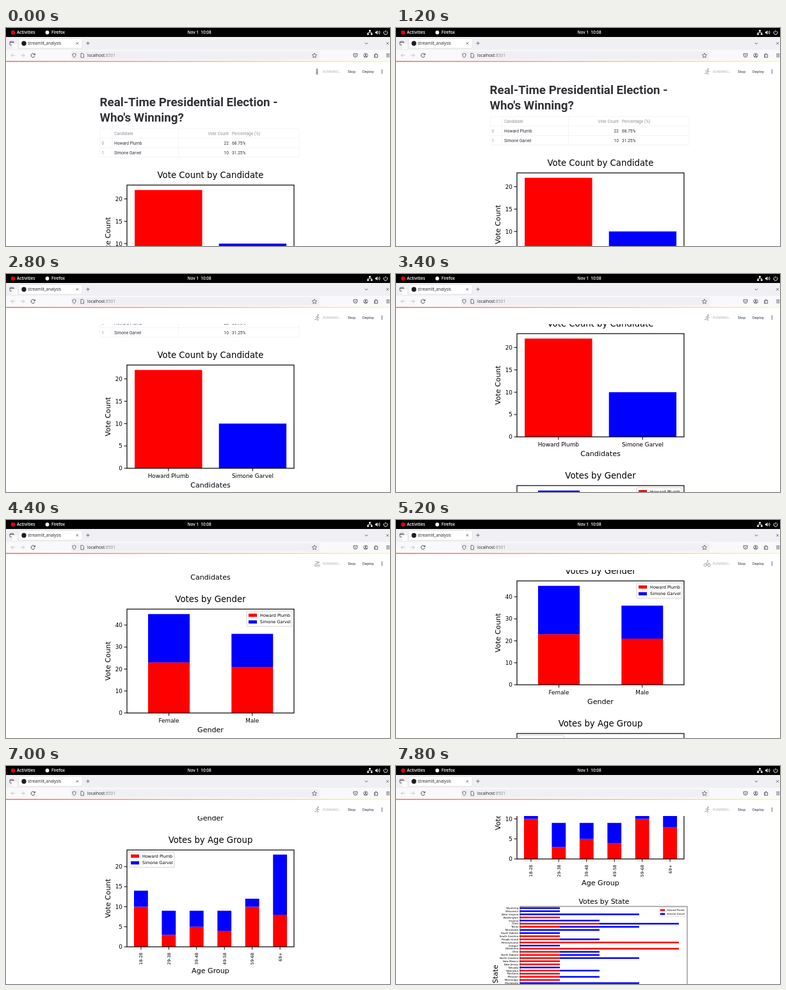
These frames come from a looping animation (600x340 px, 8 s). An HTML page:

```html
<!DOCTYPE html>
<html lang="en">
<head>
<meta charset="utf-8">
<title>Election dashboard</title>
<style>
  html, body { margin: 0; width: 100%; height: 100%; overflow: hidden; background: #fff; }
  svg { display: block; width: 600px; height: 340px; }
  text { white-space: pre; }
  .plot { font-family: "DejaVu Sans", sans-serif; }
  .app { font-family: Roboto, sans-serif; }
  .ui { font-family: "Open Sans", sans-serif; }
</style>
</head>
<body>
<svg id="stage" viewBox="0 0 600 340"></svg>
<script>
const RED = '#f00', BLUE = '#00f', INK = '#31333f';
const CANDIDATES = ['Howard Plumb', 'Simone Garvel'];
const LOOP = 8000, STEP = 200;

// Resting points of the scroll: [time, offset]
const SCROLL = [[0, 0], [800, 0], [1800, 53], [2200, 53], [3400, 152], [4400, 343],
  [5200, 387], [6200, 452], [7000, 589], [7800, 726]];

const rect = (x, y, w, h, fill, extra = '') =>
  `<rect x="${x}" y="${y}" width="${w}" height="${h}" fill="${fill}" ${extra}/>`;
const path = (d, stroke = '#000', width = 1, extra = '') =>
  `<path d="${d}" fill="none" stroke="${stroke}" stroke-width="${width}" ${extra}/>`;
const dot = (x, y, r, fill) => `<circle cx="${x}" cy="${y}" r="${r}" fill="${fill}"/>`;

// y is the middle of the capital letters
function text(x, y, string, size, { fill = '#000', anchor = 'start', weight = 400, turn = false } = {}) {
  const rotate = turn ? `transform="rotate(-90 ${x} ${y})"` : '';
  return `<text x="${x}" y="${y + size * 0.365}" font-size="${size}" fill="${fill}" ` +
    `text-anchor="${anchor}" font-weight="${weight}" ${rotate}>${string}</text>`;
}
const middle = (x, y, string, size, turn) => text(x, y, string, size, { anchor: 'middle', turn });

function legend(x, y, scale = 1) {
  const entries = CANDIDATES.map((name, i) =>
    rect(3, 4 + i * 10.5, 13, 5, i ? BLUE : RED) + text(21, 6.5 + i * 10.5, name, 6.5)).join('');
  return `<g transform="translate(${x} ${y}) scale(${scale})">` +
    rect(0, 0, 71, 24, '#fff', 'fill-opacity=".8" stroke="#ccc" stroke-width=".9" rx="2"') + entries + '</g>';
}

// bars: [label, red votes, total votes]
function barChart({ top, bottom, title, xLabel, step, bars, firstX, pitch, barWidth, turned }) {
  const limit = Math.max(...bars.map(bar => bar[2])) * 1.05;
  const yOf = votes => bottom - votes * (bottom - top) / limit;
  let out = '';
  bars.forEach(([label, red, total], i) => {
    const x = firstX + i * pitch, left = x - barWidth / 2;
    out += rect(left, yOf(red), barWidth, bottom - yOf(red), RED);
    out += rect(left, yOf(total), barWidth, yOf(red) - yOf(total), BLUE);
    out += path(`M${x} ${bottom}v4.5`);
    out += turned
      ? text(x, bottom + 9, label, 6.5, { anchor: 'end', turn: true })
      : middle(x, bottom + 12, label, 8.85);
  });
  for (let votes = 0; votes <= limit; votes += step) {
    out += path(`M189 ${yOf(votes)}h-4.5`) + text(182, yOf(votes), votes, 8.85, { anchor: 'end' });
  }
  out += rect(189, top, 261, bottom - top, 'none', 'stroke="#000" stroke-width="1.2"');
  out += middle(319.5, top - 15.5, title, 13.3);
  out += middle(319.5, bottom + (turned ? 37 : 26), xLabel, 11.1);
  return out + middle(159, (top + bottom) / 2, 'Vote Count', 11.1, true);
}

// state, red votes, total votes
const STATES = `Wyoming 0 1|Wisconsin 0 1|West Virginia 0 3|Washington 1 1|Virginia 0 2|Utah 2 4|Texas 1 3
|Tennessee 0 2|South Dakota 0 1|South Carolina 1 1|Rhode Island 1 2|Pennsylvania 4 4|Oregon 0 1|Oklahoma 4 4
|Ohio 1 2|North Dakota 1 2|North Carolina 1 3|New Mexico 1 1|New Jersey 1 1|Nevada 0 1|Nebraska 1 2
|Montana 1 1|Missouri 1 2|Mississippi 1 1|Minnesota 0 3`;

function stateChart() {
  const top = 945, unit = 62;
  let out = middle(325, top - 8, 'Votes by State', 10.9) + middle(155, top + 105.5, 'State', 11, true);
  STATES.split('|').forEach((row, i) => {
    const [, name, red, total] = row.trim().match(/(.+) (\d) (\d)/);
    const y = top + 2.6 + i * 4.875;
    out += rect(194, y - 1.25, red * unit, 2.5, RED) + rect(194 + red * unit, y - 1.25, (total - red) * unit, 2.5, BLUE);
    out += path(`M194 ${y}h-2`, '#000', 0.5) + text(191, y, name, 4, { anchor: 'end' });
  });
  out += rect(194, top, 261, 211, 'none', 'stroke="#000" stroke-width=".6"');
  return out + legend(411, top + 2, 0.58);
}

function voteTable() {
  const gray = '#92939b', rows = [['0', CANDIDATES[0], '22', '68.75%'], ['1', CANDIDATES[1], '10', '31.25%']];
  let out = rect(147, 157, 311, 44.5, '#fff', 'stroke="#f0f0f3" stroke-width=".8" rx="2"');
  out += path('M147 172H458M147 186.7H458M166 157v44.5M269.5 157v44.5', '#f0f0f3', 0.7);
  [['', 'Candidate', 'Vote Count', 'Percentage (%)'], ...rows].forEach(([index, name, count, share], i) => {
    const y = 165 + i * 14.6, fill = i ? INK : gray;
    out += text(149.5, y, index, 6.4, { fill: gray }) + text(169, y, name, 6.6, { fill });
    out += text(348, y, count, 6.6, { fill, anchor: 'end' }) + text(353, y, share, 6.6, { fill });
  });
  return out;
}

function page() {
  const heading = { fill: '#303036', weight: 700 };
  return `<g class="app">${text(146.5, 115.3, 'Real-Time Presidential Election -', 18.8, heading)}
    ${text(146.5, 139.3, "Who's Winning?", 18.8, heading)}${voteTable()}</g><g class="plot">` +
    barChart({
      top: 245, bottom: 406, title: 'Vote Count by Candidate', xLabel: 'Candidates', step: 5,
      bars: [[CANDIDATES[0], 22, 22], [CANDIDATES[1], 0, 10]], firstX: 253.8, pitch: 131.6, barWidth: 105.4
    }) +
    barChart({
      top: 482, bottom: 644, title: 'Votes by Gender', xLabel: 'Gender', step: 10,
      bars: [['Female', 23, 45], ['Male', 21, 36]], firstX: 254.5, pitch: 130.3, barWidth: 65
    }) + legend(376, 485) +
    barChart({
      top: 720, bottom: 871, title: 'Votes by Age Group', xLabel: 'Age Group', step: 5, turned: true,
      bars: [['18-28', 10, 14], ['29-38', 3, 9], ['39-48', 5, 9], ['49-58', 4, 9], ['59-68', 10, 12], ['69+', 8, 23]],
      firstX: 210.9, pitch: 43.45, barWidth: 21.8
    }) + legend(192, 723) + stateChart() + '</g>';
}

function browser() {
  const dark = '#3a3a42', pale = '#b8b8bd', white = { fill: '#fff', weight: 600 };
  const topBar = rect(0, 0, 600, 14, '#000') + dot(11, 7, 3.2, '#e00') + text(17, 7, 'Activities', 6.5, white) +
    dot(64.5, 7, 2.9, '#fff') + text(71, 7, 'Firefox', 6.4, white) +
    text(302, 7, 'Nov 1  10:08', 6.4, { ...white, anchor: 'middle' }) +
    path('M568.5 4v3M565.5 9.5v-2.5h6v2.5', '#fff', 0.8) + rect(567.2, 3, 2.6, 2.4, '#fff') +
    rect(564.3, 8.4, 2.6, 2.4, '#fff') + rect(570, 8.4, 2.6, 2.4, '#fff') +
    '<path d="M577 5.8h1.5l2-2v6.5l-2-2H577z" fill="#fff"/>' +
    path('M582 5q1.4 2 0 4M583.3 4q2 3 0 6', '#fff', 0.7) +
    path('M591.3 4.9a3 3 0 1 0 3.6 0M593.1 3.5v3.2', '#fff', 0.9);
  const tabs = rect(0, 14, 600, 20, '#f0f0f4') +
    rect(20, 16.5, 99, 15, '#fff', 'rx="2" stroke="#dcdce0" stroke-width=".6"') +
    rect(6, 21, 6, 5.5, 'none', `rx="1" stroke="${dark}" stroke-width=".8"`) + path('M6 22.7h6', dark, 0.8) +
    rect(9, 23.5, 9.5, 10, '#fafafa', 'stroke="#ddd" stroke-width=".5"') +
    dot(28, 24, 3.7, '#1c1c22') + text(34, 24, 'streamlit_analysis', 6.3, { fill: '#222' }) +
    path('M109.7 22.2l3.4 3.4m0-3.4l-3.4 3.4M594.4 22.2l3.6 3.6m0-3.6l-3.6 3.6', dark, 0.7) +
    path('M128 21v5.6M125.200 23.800h5.600', dark, 0.7) +
    path('M560.8 23l2.2 2.2 2.2-2.2', dark, 0.8);
  const toolbar = rect(0, 34, 600, 18, '#f9f9fb') + rect(102, 36, 388, 13.5, '#f0f0f4', 'rx="2"') +
    path('M14 42.7H8m2.6-2.6L8 42.7l2.6 2.6M23 42.7h6m-2.6-2.6l2.6 2.6-2.6 2.6', pale, 0.8) +
    path('M44.8 41.3a3 3 0 1 0 .2 2.4M45.3 39.5v2.3H43', dark, 0.9) +
    path('M106.5 39.6l2.7 1q0 4-2.7 5.6-2.7-1.6-2.7-5.6z', dark, 0.7) +
    path('M117 39.6h3l1.5 1.5v4.9H117z', dark, 0.7) +
    text(127, 42.8, 'localhost<tspan fill="#85858c">:8501</tspan>', 6.5, { fill: '#222' }) +
    path('M482 39.2l1.1 2.3 2.5.3-1.8 1.8.4 2.5-2.2-1.2-2.2 1.2.4-2.5-1.8-1.8 2.5-.3z', dark, 0.7) +
    path('M543 40h6v2.5a3 3 0 0 1-6 0zM544.5 42l1.5 1.4 1.5-1.4', dark, 0.8) +
    `<circle cx="562" cy="42.7" r="3.2" fill="none" stroke="${dark}" stroke-width=".7"/>` +
    dot(562, 41.8, 1.1, dark) + path('M560 44.6q2-1.6 4 0', dark, 0.9) +
    path('M575.5 41.5h1.7v-1.5h1.8v1.5h1.7v4.3h-5.2v-1.6h1.3v-1.3h-1.3z', dark, 0.8) +
    path('M594.200 40.5h5.2m-5.2 2.2h5.2m-5.2 2.2h5.2', dark, 0.8);
  const small = { fill: INK };
  const header = rect(0, 51.5, 600, 1.3, 'url(#stripe)') +
    `<g class="app">${text(495, 68, 'RUNNING...', 5.7, { fill: '#b4b5bb' })}${text(534, 68, 'Stop', 5.9, small)}` +
    `${text(557, 68, 'Deploy', 5.9, small)}</g>` +
    [65.7, 68, 70.3].map(y => dot(587.5, y, 0.8, INK)).join('');
  return `<g class="ui">${topBar}${tabs}${toolbar}${header}</g>`;
}

// Activity figures, each in a 10 by 10 box
const FIGURES = {
  stand: dot(5, 1.5, 1.2, '#777') + path('M5 3v3.5M3.5 4h3M4.2 9.5V6h1.6v3.5', '#777', 1.1),
  run: dot(6.6, 1.3, 1.1, '#8c8d94') + path('M2.5 4.5l2-1.3 1.5.3-1.2 2.7 1.7 1.3-.5 2.5M4.8 6.2l-1 1.8H1.2M6 3.5l1 1.5h1.8', '#8c8d94', 0.9),
  swim: dot(7.5, 3, 1.1, '#8c8d94') + path('M2 2.2l3-.4 1.3 2.5L2 5.5M.5 7q1.2-1 2.3 0t2.3 0 2.3 0 2.3 0M.5 9q1.2-1 2.3 0t2.3 0 2.3 0 2.3 0', '#8c8d94', 0.8),
  cycle: dot(6, 1, 1, '#8c8d94') + path('M0 7.3a2.1 2.1 0 1 0 4.2 0a2.1 2.1 0 1 0-4.2 0M6.3 7.3a2.1 2.1 0 1 0 4.2 0a2.1 2.1 0 1 0-4.2 0M5.2 8V6L3.5 4.7l2-2L7 4.3h1.6', '#8c8d94', 0.8),
  wheel: dot(4.5, 1.2, 1.1, '#8c8d94') + path('M4.3 2.7v3.2h2.8l1 2.8h1M4.3 4h2.5M3.2 4.7a2.5 2.5 0 1 0 3.3 3', '#8c8d94', 0.9)
};
// [start time, figure]
const ACTIVITY = [[0, 'stand'], [1200, 'run'], [3800, 'swim'], [4800, 'cycle'], [5800, 'wheel'], [7000, 'run']];

document.getElementById('stage').innerHTML =
  `<defs><linearGradient id="stripe"><stop stop-color="#ff4b4b"/><stop offset="1" stop-color="#fffd80"/></linearGradient>
  <clipPath id="view">${rect(0, 78, 600, 262, '#000')}</clipPath></defs>
  <g clip-path="url(#view)"><g id="page">${page()}</g></g>${browser()}<g id="figure" transform="translate(481 63)"></g>`;
const pageGroup = document.getElementById('page');
const figureGroup = document.getElementById('figure');

// Each scroll gesture eases in and out between two resting points
function scrollAt(time) {
  const next = SCROLL.findIndex(([at]) => at >= time);
  if (next <= 0) return SCROLL[0][1];
  const [t0, y0] = SCROLL[next - 1], [t1, y1] = SCROLL[next];
  const part = (time - t0) / (t1 - t0);
  return Math.round(y0 + (y1 - y0) * part * part * (3 - 2 * part));
}

let shown = -1;
function draw() {
  const time = Math.floor(performance.now() % LOOP / STEP) * STEP;
  if (time !== shown) {
    shown = time;
    pageGroup.setAttribute('transform', `translate(0 ${-scrollAt(time)})`);
    figureGroup.innerHTML = FIGURES[ACTIVITY.filter(([start]) => start <= time).pop()[1]];
  }
  requestAnimationFrame(draw);
}
draw();
</script>
</body>
</html>
```
